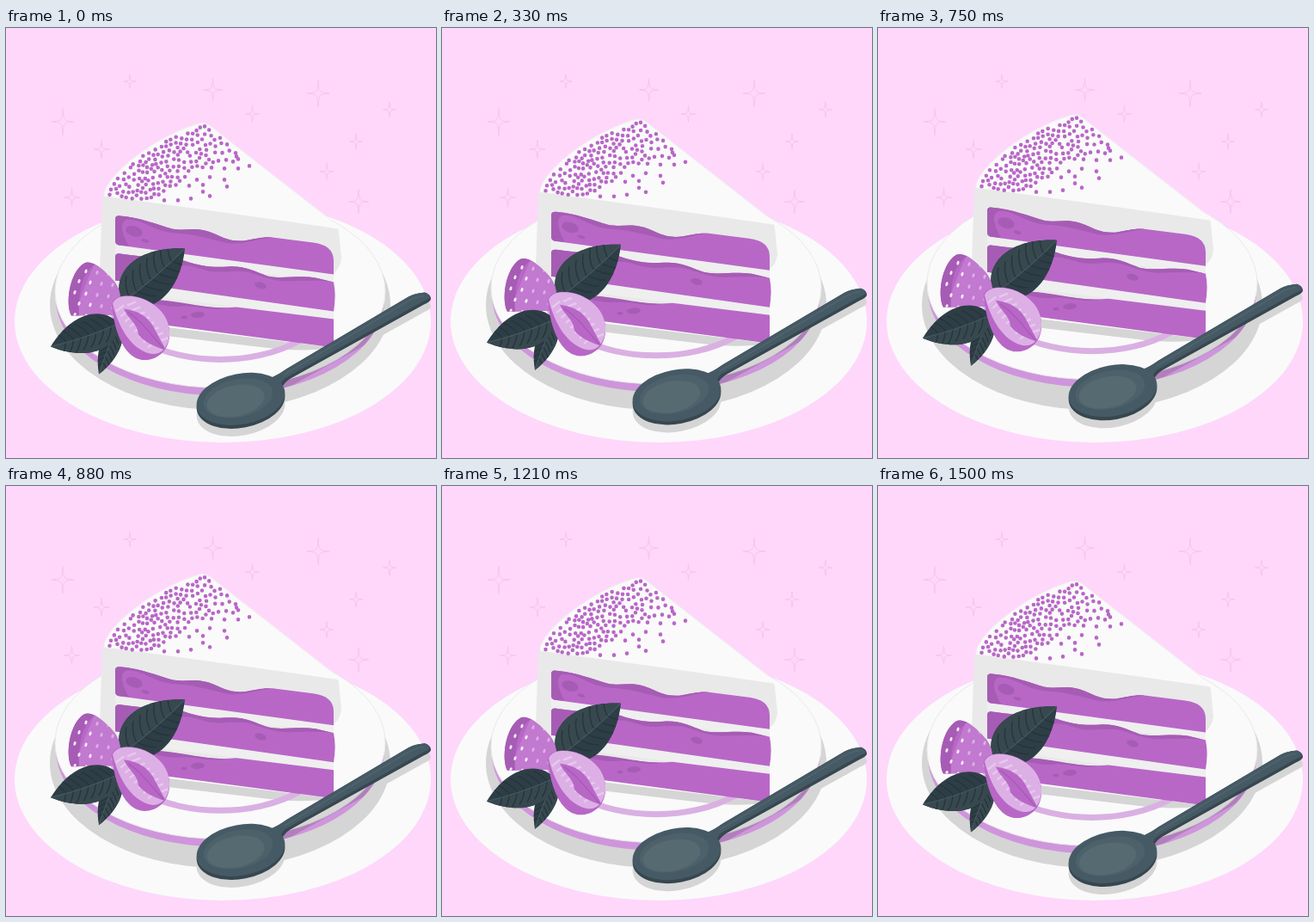
An HTML page with a canvas that plays this animation: 500 by 500 pixels, repeating every 1540 ms.

```html
<!DOCTYPE html>
<html lang="en">
<head>
<meta charset="utf-8">
<title>Slice of cake</title>
<style>
html, body { margin: 0; height: 100%; overflow: hidden; background: #fed7fb; }
canvas { display: block; width: 500px; height: 500px; }
</style>
</head>
<body>
<canvas id="stage"></canvas>
<script>
const LOOP = 1540, PEAK = 730, LANDING = 1500, LIFT = 10;
const PURPLE = '#b867c7', DEEP = '#a65cb4', SHADE = '#d5d5d5', WHITE = '#fafafa';
const canvas = document.getElementById('stage');
const ratio = window.devicePixelRatio || 1;
canvas.width = canvas.height = 500 * ratio;
const ctx = canvas.getContext('2d');

function fill(path, color) {
  ctx.fillStyle = color;
  ctx.fill(typeof path === 'string' ? new Path2D(path) : path);
}
function line(path, color, width) {
  ctx.strokeStyle = color;
  ctx.lineWidth = width;
  ctx.stroke(typeof path === 'string' ? new Path2D(path) : path);
}
function oval(x, y, rx, ry, turn = 0) {
  const path = new Path2D();
  path.ellipse(x, y, rx, ry, turn, 0, Math.PI * 2);
  return path;
}
function clipped(path, draw) {
  ctx.save();
  ctx.clip(path);
  draw();
  ctx.restore();
}

function drawStar(x, y, r) {
  const k = r * 0.08, h = r * 1.2;
  const star = new Path2D();
  star.moveTo(x, y - h);
  star.bezierCurveTo(x + k, y - k, x + k, y - k, x + r, y);
  star.bezierCurveTo(x + k, y + k, x + k, y + k, x, y + h);
  star.bezierCurveTo(x - k, y + k, x - k, y + k, x - r, y);
  star.bezierCurveTo(x - k, y - k, x - k, y - k, x, y - h);
  line(star, '#f3c5ed', 0.9);
}
const stars = [
  [144, 62, 7], [240.5, 72, 11], [363, 76, 13], [286.5, 100, 8], [446, 95, 7.5], [66, 109, 13],
  [111, 141, 9], [407, 132, 7.5], [373, 167, 8], [76.5, 197, 9], [410, 202, 11.5]
];

const plateTop = oval(249, 306, 192, 112);
const plateRim = oval(249, 314, 191, 113);
const bowl = oval(273, 431, 52, 29.5, -0.19);
const spoon = new Path2D();
spoon.addPath(oval(273, 434.5, 52, 30, -0.19));
spoon.addPath(new Path2D('M308 407Q318 402 326 396L468 312Q475 308 487 307Q494 309 494 315Q493 318 486 321L331 407Q324 411 320 419Z'));
const spoonShadow = new Path2D();
spoonShadow.addPath(spoon, new DOMMatrix().translate(0, 9));

function drawPlate() {
  fill(plateRim, '#cf95dc');
  fill(plateTop, WHITE);
  line(plateTop, '#ebe9eb', 1);
  fill('M150 343L381 371Q345 377 300 371L165 355Z', SHADE);
  line(oval(249, 310, 130, 75), '#dab0e3', 7);
  clipped(plateRim, () => fill(spoonShadow, 'rgba(0,0,0,.145)'));
}

// Loose sprinkles on the right; the dense part is scattered below.
const sprinkles = [
  [283, 160], [270, 163], [268, 149], [254, 163], [257, 184], [254, 176], [237, 173], [237, 195],
  [229, 182], [222, 176], [215, 198], [213, 183], [239, 162], [229, 190], [200, 200], [184, 200],
  [264, 155], [247, 154], [256, 153], [270, 152], [231, 114], [267, 145]
];
let seed = 11;
function random() {
  seed = (seed * 16807) % 2147483647;
  return seed / 2147483647;
}
const dense = new Path2D('M117 193C119 174 176 128 226 115L236 116L267 143L252 147L238 160L215 164L205 180L180 193L160 200L118 194Z');
for (let i = 0; i < 6000 && sprinkles.length < 220; i++) {
  const x = 115 + random() * 155, y = 110 + random() * 90;
  const gap = 4.2 + random() * 2 + Math.max(0, x - 200) / 40;
  const inside = ctx.isPointInPath(dense, x, y);
  if (inside && sprinkles.every(([a, b]) => Math.hypot(a - x, b - y) > gap)) sprinkles.push([x, y]);
}

function drawCake() {
  fill('M112 196Q113 193 118 194L379 229Q387 231 387 237L390 267Q389 279 381 284L381 369L150 338L118 300Q109 294 109 283Z', '#e9e9e9');
  fill('M127 251L381 286V296L127 262ZM127 292L381 329V338L127 306Z', '#efefef');

  fill('M127 222Q127 217 133 218C157 220 175 228 193 233C208 236 218 231 235 236C252 242 258 248 276 247C290 245 298 242 310 243L357 249Q381 252 381 270V286L131 252Q127 251 127 247Z', PURPLE);
  fill('M127 222Q127 217 133 218C157 220 175 228 193 233C208 236 218 231 235 236C252 242 258 248 276 247C290 245 298 242 310 243C290 245 272 253 254 249C232 243 216 239 196 238C172 236 159 222 141 222C131 225 135 239 143 253L131 252Q127 251 127 247Z', DEEP);
  fill(oval(149, 236, 10, 6, 0.3), DEEP);
  fill(oval(162, 247, 4.5, 2, 0.3), DEEP);

  fill('M127 266Q127 261 133 262C165 267 190 266 207 270C228 277 240 278 258 277C278 276 290 283 304 288C320 292 340 287 360 290L381 295Q384 311 381 329L127 293Z', PURPLE);
  fill('M127 266Q127 261 133 262C165 267 190 266 207 270C228 277 240 278 258 277C278 276 290 283 304 288C320 292 340 287 360 290L381 295C360 292 345 294 325 294C308 293 295 287 280 283C262 281 250 285 235 282C222 279 215 275 205 276L145 278L143 295L127 293Z', DEEP);
  fill(oval(296, 299, 7, 3.7, 0.3), DEEP);

  fill('M127 309L180 316C215 321 240 327 268 324L381 338V371L140 339Z', PURPLE);
  fill('M150 312L180 316C215 319 229 325 257 325C237 329 222 322 205 323C190 325 180 320 160 319Z', DEEP);
  fill(oval(223, 333, 8, 3.5, -0.08), DEEP);
  fill(oval(207, 336, 3.5, 1.8), DEEP);

  fill('M114 195C114 172 175 124 226 110.5Q231 109.5 238 114L379 224Q386 228 386 233Q300 220 114 195Z', WHITE);
  line('M114 195C114 172 175 124 226 110.5Q231 109.5 238 114L379 224', '#f3f1f3', 1.2);
  const dots = new Path2D();
  for (const [x, y] of sprinkles) dots.addPath(oval(x, y, 2.3, 2.3));
  fill(dots, PURPLE);
}

// A leaf runs from its base to its tip, bulging by `wide`, with a lighter half and side veins.
function drawLeaf(x, y, tipX, tipY, wide, bend) {
  ctx.save();
  ctx.translate(x, y);
  ctx.rotate(Math.atan2(tipY - y, tipX - x));
  const n = Math.hypot(tipX - x, tipY - y);
  const top = `C${n * 0.1} ${-wide} ${n * 0.55} ${-wide * 1.25} ${n} 0`;
  const rib = `Q${n * 0.5} ${bend} 0 0`;
  const low = `C${n * 0.58} ${wide * 1.15} ${n * 0.13} ${wide} 0 0`;
  const whole = new Path2D(`M0 0${top}${low}Z`);
  fill(whole, '#2e3e46');
  fill(`M0 0${top}${rib}Z`, '#37484f');
  clipped(whole, () => {
    for (let i = 1; i < 8; i++) {
      const a = n * i / 9, b = a + n * 0.14;
      line(`M${b} ${-wide * 0.62}Q${a + 4} ${-wide * 0.4} ${a} 0Q${a + 5} ${wide * 0.4} ${b} ${wide * 0.6}`, '#26343b', 1.3);
    }
    line(`M${n} 0${rib}`, '#455861', 1.1);
  });
  ctx.restore();
}

const berry = new Path2D('M91 273C98 270 108 276 117 285C127 294 133 302 133 315L126 333L76 334C69 321 73 284 91 273Z');
const half = new Path2D('M123 323C122 312 137 309 152 312C177 318 192 337 190 358C189 376 174 387 158 385.5C138 382 127 356 123 323Z');

function drawBerries() {
  drawLeaf(135, 319, 208, 256, 33, 4);
  fill(berry, PURPLE);
  clipped(berry, () => {
    fill('M78 335C88 313 94 292 103 274L140 292V335Z', '#c279d0');
    fill('M70 340C66 310 72 280 91 270L104 274C87 285 84 310 85 340Z', DEEP);
    for (let i = 0; i < 20; i++) {
      const x = 80 + (i % 4) * 13 + (i >> 2) % 2 * 5;
      const y = 281 + (i >> 2) * 13 + (i % 4) * 1.5;
      fill(oval(x, y, 1.5, 2.5, 0.3), i % 4 > 1 ? '#dcb0e5' : '#f7e9fa');
    }
  });
  drawLeaf(131, 343, 108, 402, 14, 2);
  drawLeaf(131, 343, 52, 370, 26, -4);

  fill(half, PURPLE);
  clipped(half, () => {
    fill('M124 320C128 309 147 310 160 315C182 324 192 341 190 357C188 373 178 381 167 378C144 372 130 345 124 320Z', '#dcb0e5');
    for (let i = 0; i < 8; i++) {
      const a = 137 + i * 5.3, b = 322 + i * 6;
      line(`M${a} ${b}L${a - 9} ${b + 7}M${a + 4} ${b}L${a + 14} ${b - 4}`, '#e8c8ee', 2.4);
    }
    fill('M137 326C154 328 164 335 171 346L186 374C174 371 160 364 154 356C153 343 142 338 137 326Z', PURPLE);
    line('M142 330C157 340 165 352 183 372', DEEP, 1.5);
  });
}

function drawSpoon() {
  fill(spoon, '#37474f');
  fill('M306 407Q318 402 326 396L468 312Q475 308 487 307Q493 309 492 314L484 318L328 405Q321 408 319 416Z', '#455a64');
  fill(bowl, '#455a64');
  fill(oval(270, 430, 41, 22, -0.21), '#4c616a');
  fill(oval(267, 433, 34, 18, -0.21), '#566a72');
  line('M323 403L468 317Q477 312 486 311', '#50656e', 1.3);
}

function draw(time) {
  const t = time % LOOP;
  const lift = LIFT * Math.max(0, Math.min(t / PEAK, (LANDING - t) / (LANDING - PEAK)));
  ctx.setTransform(ratio, 0, 0, ratio, 0, 0);
  fill('M0 0H500V500H0Z', '#fed7fb');
  stars.forEach(star => drawStar(...star));
  fill(oval(252, 341, 242, 141), WHITE);
  fill(oval(249, 322, 198, 122), SHADE);
  ctx.translate(0, 0.4 - lift);
  ctx.globalCompositeOperation = 'darken';
  fill(spoonShadow, SHADE);
  ctx.globalCompositeOperation = 'source-over';
  drawPlate();
  drawCake();
  drawBerries();
  drawSpoon();
}

const start = performance.now();
function tick() {
  draw(performance.now() - start);
  requestAnimationFrame(tick);
}
tick();
</script>
</body>
</html>
```
